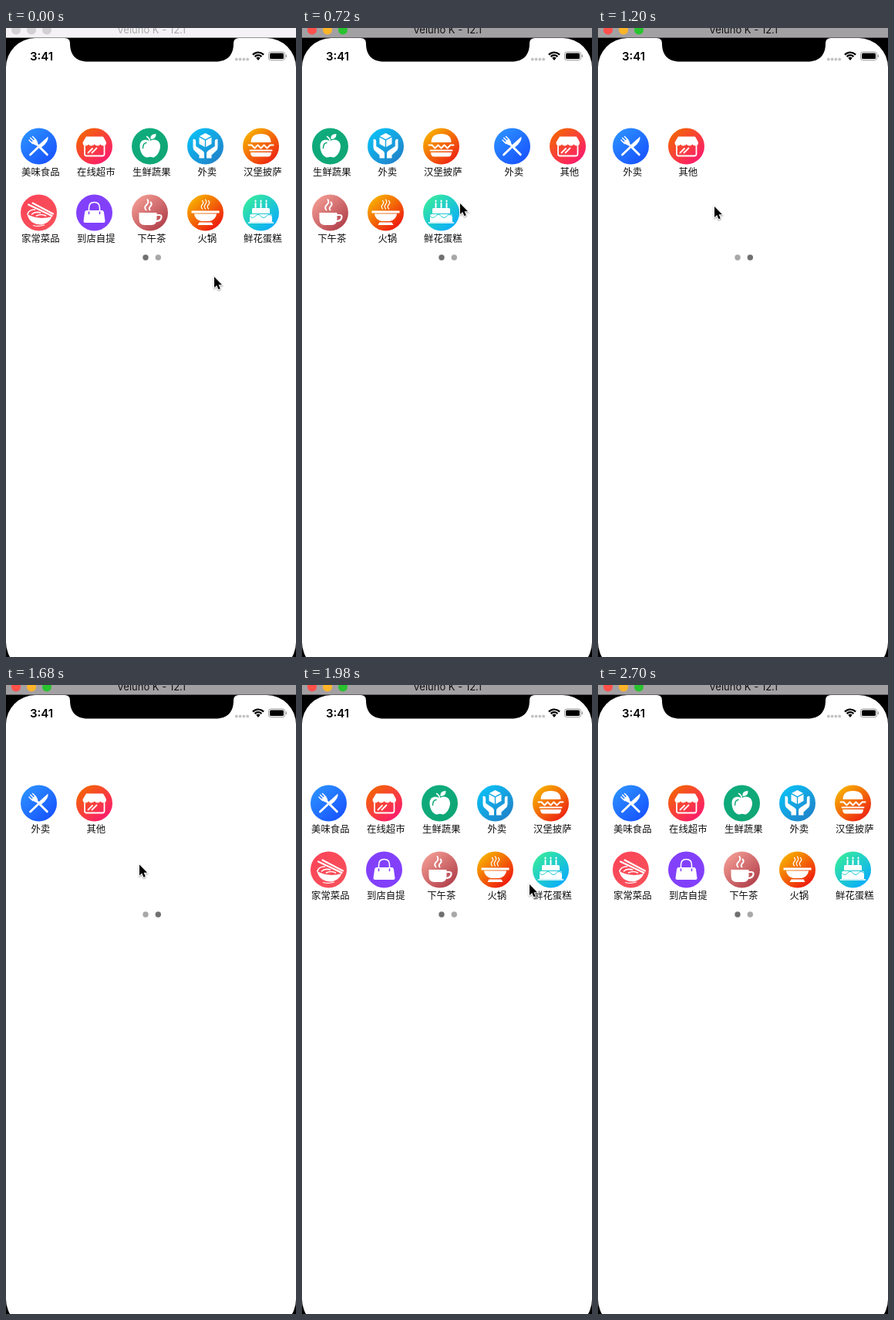
An HTML page with a canvas that plays this animation: 376 px wide and 814 px high, repeating every 3300 ms.

```html
<!DOCTYPE html>
<html lang="zh-CN">
<head>
<meta charset="utf-8">
<style>
html, body { margin: 0; width: 100%; height: 100%; overflow: hidden; background: #fff; }
canvas { display: block; }
</style>
</head>
<body>
<canvas id="stage" width="376" height="814"></canvas>
<script>
const ctx = document.getElementById('stage').getContext('2d');
const LOOP = 3300, STEP = 60, PAGE = 380, RADIUS = 23.5;

// Each icon: gradient ends, then layers of [kind, path, line width].
const icons = {
  cutlery: ['#2a8cff', '#1957ff', [
    ['line', 'M10.8 10.8 L-3 -3', 3],
    ['line', 'M-12.5 -8 L-8 -3.5 M-10.8 -10.8 L-6 -6 M-8 -12.5 L-3.5 -8', 1.5],
    ['fill', 'M-9.5 -5 L-5 -9.5 L-2 -6.5 Q-.5 -3 -2 -1.5 Q-5 -.5 -9.5 -5Z'],
    ['fill', 'M12 -12.5 Q13 -6 4 1 L1.5 3 L-2 0Z'],
    ['line', 'M-1.5 2 L-11 11', 2.8]]],
  shop: ['#f4600c', '#fb1f68', [
    ['fill', 'M-10.5 -12.5 H11 Q12 -12.5 15.5 -5 Q15.5 -.5 11.7 -.5 Q9 -.5 8 -2.5 Q6.5 -.5 4.2 -.5 Q2 -.5 .2 -2.5 Q-1.5 -.5 -4 -.5 Q-6.5 -.5 -7.5 -2.5 Q-8.5 -.5 -11.5 -.5 Q-15 -.5 -15 -5Z'],
    ['line', 'M-12.5 0 V10 Q-12.5 12.5 -10 12.5 H10.5 Q13 12.5 13 10 V0', 1.8],
    ['line', 'M-8 8.5 L-2.5 3 M-3 8.5 L3 2.5', 1.8]]],
  apple: ['#0fab7c', '#0fa674', [
    ['fill', 'M0 -6.5 C4 -10.5 13.5 -9 13.5 0 C13.5 8 7 15 4 14.5 Q0 13 -3 14.5 C-8 15 -13 8 -13 0 C-13 -9 -5 -9.5 0 -6.5Z'],
    ['fill', 'M1 -9 Q0 -16 8 -16 Q8.5 -9 1 -9Z'],
    ['line', 'M0 -7 Q-1 -11 -4 -12.5', 1.5],
    ['cut', 'M-9 2.5 Q-9 -4 -4.5 -4.5', 1.5]]],
  hands: ['#0cbcf2', '#1f86cc', [
    ['fill', 'M0 -17 L7.5 -13 L0 -9 L-7.5 -13Z'],
    ['fill', 'M-8 -11.5 L-.7 -7.8 V1 L-8 -3Z M8 -11.5 L.7 -7.8 V1 L8 -3Z'],
    ['fill', 'M-16 -9 Q-12.5 -10 -12.3 -6 V0 L-4 5.5 Q-1.5 7 -1.5 9 V15.5 H-8 V11.5 L-15 5 Q-16 3 -16 1Z'],
    ['fill', 'M16 -9 Q12.5 -10 12.3 -6 V0 L4 5.5 Q1.5 7 1.5 9 V15.5 H8 V11.5 L15 5 Q16 3 16 1Z']]],
  burger: ['#f7a800', '#ee2a12', [
    ['fill', 'M-13 -5 Q-13 -16 0 -16 Q13 -16 13 -5Z'],
    ['line', 'M-16 -1.5 H-12 L-8 2.5 L-4 -1.5 L0 2.5 L4 -1.5 L8 2.5 L12 -1.5 H16', 2],
    ['line', 'M-14 5.5 H14', 2],
    ['fill', 'M-13.5 8 H13.5 Q13.5 13.5 9 13.5 H-9 Q-13.5 13.5 -13.5 8Z']]],
  noodles: ['#fb4658', '#f7505a', [
    ['fill', 'M-15 2 Q0 10 17 5 Q14 13 4 15.5 Q-12 15.5 -15 2Z'],
    ['line', 'M-14.5 2 Q-13 -4 -5 -4 M-9 2 Q-5 -2 2 0 M-3 4 Q3 1 9 4', 1.6],
    ['line', 'M-13.5 -10.5 L17 4 M-8 -12.5 L18.5 1.5', 2.1],
    ['line', 'M-7 16.5 Q0 18.5 7 16', 1.2]]],
  bag: ['#8240fb', '#8240fb', [
    ['fill', 'M-10 -3 H10 Q12 -3 12.5 0 L14 11 Q14 13 12 13 H-12 Q-14 13 -14 11 L-12.5 0 Q-12 -3 -10 -3Z'],
    ['line', 'M-7 -1 V-6 Q-7 -13.5 0 -13.5 Q7 -13.5 7 -6 V-1', 1.6],
    ['cut', 'M-7 -1 V1.5 M7 -1 V1.5', 1.6]]],
  coffee: ['#ee958e', '#b5454f', [
    ['fill', 'M-14 0 H9 V8 Q9 16 2 16 H-7 Q-14 16 -14 8Z'],
    ['line', 'M9 3 H12 Q15.5 3 15 6 Q14 11 8 11', 2.2],
    ['line', 'M-5 -3.5 Q-8 -7 -4 -10.5 Q-1 -13 -3 -17 M0 -3.5 Q-2 -6 1 -8.5 Q3.5 -11 1 -13.5', 1.9]]],
  pot: ['#f7a800', '#ee1f0e', [
    ['fill', 'M-18 -2.5 H18 V.5 H15 Q13 10 5 11 H-5 Q-13 10 -15 .5 H-18Z'],
    ['cut', 'M-15 1 H15', .9],
    ['fill', 'M-8 12.5 H8 L10 16 H-10Z'],
    ['line', 'M-4 -5 q-2.5 -3 0 -5.5 t0 -5 M0 -5 q-2.5 -3 0 -6 t0 -6 M4 -5 q-2.5 -3 0 -5.5 t0 -5', 1.2]]],
  cake: ['#33e6a4', '#0cb0f6', [
    ['fill', 'M-10 -6 H10 Q11.5 -6 11.5 -4 V1 H-11.5 V-4 Q-11.5 -6 -10 -6Z'],
    ['fill', 'M-12.5 2 H12.5 Q14.5 2 14.5 4 V12 H-14.5 V4 Q-14.5 2 -12.5 2Z'],
    ['cut', 'M-14.5 4.5 q3.6 4 7.2 0 t7.2 0 t7.2 0 t7.4 0', 1],
    ['line', 'M-16 13 H16', 1.6],
    ['line', 'M-7 -7 V-12 M0 -7 V-12 M7 -7 V-12 M-7 -14.6 V-15.4 M0 -14.6 V-15.4 M7 -14.6 V-15.4', 2]]]
};
for (const icon of Object.values(icons))
  icon[2] = icon[2].map(([kind, d, width]) => [kind, new Path2D(d), width]);

const pages = [
  [['cutlery', '美味食品'], ['shop', '在线超市'], ['apple', '生鲜蔬果'], ['hands', '外卖'], ['burger', '汉堡披萨'],
   ['noodles', '家常菜品'], ['bag', '到店自提'], ['coffee', '下午茶'], ['pot', '火锅'], ['cake', '鲜花蛋糕']],
  [['cutlery', '外卖'], ['shop', '其他']]
];

// Keyframes: [time, values...]
const scrollKeys = [[600, 0], [660, 35], [720, 150], [780, 275], [840, 341], [900, 368], [960, 377], [1020, 380],
  [1680, 380], [1740, 330], [1800, 180], [1860, 72], [1920, 26], [1980, 8], [2040, 2], [2100, 0]];
const pointerKeys = [[60, 270, 322], [180, 268, 312], [420, 255, 228], [540, 253, 218], [600, 253, 218], [720, 205, 227],
  [840, 163, 230], [1080, 151, 231], [1620, 151, 231], [1740, 195, 234], [1800, 262, 238], [1860, 292, 239],
  [1980, 295, 258], [2040, 293, 380], [2100, 288, 540], [2160, 284, 636], [2220, 283, 654], [2340, 283, 665], [2520, 283, 830]];

function sample(keys, t) {
  const next = keys.findIndex(key => key[0] > t);
  if (next < 0) return keys[keys.length - 1].slice(1);
  if (next === 0) return keys[0].slice(1);
  const a = keys[next - 1], b = keys[next], k = (t - a[0]) / (b[0] - a[0]);
  return a.slice(1).map((v, i) => v + (b[i + 1] - v) * k);
}

function disc(x, y, r, color) {
  ctx.fillStyle = color;
  ctx.beginPath();
  ctx.arc(x, y, r, 0, Math.PI * 2);
  ctx.fill();
}

function text(str, x, y, font, color) {
  ctx.font = font;
  ctx.fillStyle = color;
  ctx.fillText(str, x, y);
}

function drawIcon(name, x, y) {
  const [from, to, layers] = icons[name];
  ctx.save();
  ctx.translate(x, y);
  const paint = ctx.createLinearGradient(-15, -17, 15, 17);
  paint.addColorStop(0, from);
  paint.addColorStop(1, to);
  disc(0, 0, RADIUS, paint);
  ctx.fillStyle = '#fff';
  ctx.lineCap = ctx.lineJoin = 'round';
  for (const [kind, path, width] of layers) {
    if (kind === 'fill') { ctx.fill(path); continue; }
    ctx.lineWidth = width;
    ctx.strokeStyle = kind === 'cut' ? paint : '#fff';
    ctx.stroke(path);
  }
  ctx.restore();
}

function drawMenu(scroll) {
  pages.forEach((items, page) => items.forEach(([name, label], i) => {
    const x = 42.5 + page * PAGE - scroll + (i % 5) * 72;
    const y = 153 + Math.floor(i / 5) * 86;
    if (x < -40 || x > 420) return;
    drawIcon(name, x, y);
    text(label, x + 2.3, y + 38, '12.4px "Noto Sans CJK SC", "Noto Sans CJK", sans-serif', '#111');
  }));
  const second = scroll > PAGE / 2;
  disc(181, 297, 3.7, second ? '#a8a8a8' : '#707070');
  disc(197.3, 297, 3.7, second ? '#707070' : '#a8a8a8');
}

const notch = new Path2D('M76 13 Q83 13 83 20 C83 35 91 43.5 106 43.5 H272 C287 43.5 295 35 295 20 Q295 13 302 13Z');

function drawFrame(active) {
  ctx.fillStyle = '#000';
  ctx.fillRect(0, 0, 376, 814);
  ctx.fillStyle = active ? '#a3a0a3' : '#f4f2f4';
  ctx.fillRect(0, 0, 376, 12.6);
  const lights = active ? ['#ff4f4b', '#ffb429', '#29c330'] : ['#d2d0d2', '#d2d0d2', '#d2d0d2'];
  lights.forEach((color, i) => disc(13 + i * 20, 2.5, 6, color));
  text('Veluno K - 12.1', 188.5, 7, '13px Inter, sans-serif', active ? '#111' : '#aaa8aa');
  ctx.fillStyle = '#fff';
  ctx.beginPath();
  ctx.roundRect(0, 13, 376, 820, 38);
  ctx.fill();
  ctx.fillStyle = '#000';
  ctx.fill(notch);
}

function drawStatus() {
  text('3:41', 46, 42, '600 15px Inter, sans-serif', '#000');
  for (let i = 0; i < 4; i++) disc(298.8 + i * 4.8, 40.5, 1.9, '#c4c4c4');
  ctx.strokeStyle = '#000';
  ctx.lineCap = 'butt';
  ctx.lineWidth = 2.3;
  for (const r of [6, 9.6]) {
    ctx.beginPath();
    ctx.arc(327, 41.2, r, -Math.PI * .76, -Math.PI * .24);
    ctx.stroke();
  }
  ctx.fillStyle = '#000';
  ctx.beginPath();
  ctx.moveTo(327, 42);
  ctx.arc(327, 41.2, 3.6, -Math.PI * .76, -Math.PI * .24);
  ctx.fill();
  ctx.strokeStyle = '#999';
  ctx.lineWidth = 1;
  ctx.beginPath();
  ctx.roundRect(340.5, 31, 21, 10.6, 2.8);
  ctx.stroke();
  ctx.beginPath();
  ctx.roundRect(342, 32.5, 18, 7.6, 1.5);
  ctx.fill();
  ctx.fillStyle = '#999';
  ctx.fillRect(362.8, 34.5, 1.3, 3.6);
}

const arrow = new Path2D('M0 0 V14 L3.2 11.1 L5.5 16.2 L7.8 15.2 L5.6 10.3 H10Z');

function drawPointer([x, y]) {
  ctx.save();
  ctx.translate(x, y);
  ctx.lineJoin = 'miter';
  ctx.lineWidth = 1.8;
  ctx.strokeStyle = '#fff';
  ctx.shadowColor = 'rgba(0,0,0,.4)';
  ctx.shadowBlur = 2;
  ctx.shadowOffsetY = 1;
  ctx.stroke(arrow);
  ctx.shadowColor = 'transparent';
  ctx.fillStyle = '#000';
  ctx.fill(arrow);
  ctx.restore();
}

function render() {
  const t = Math.floor(performance.now() % LOOP / STEP) * STEP;
  ctx.textAlign = 'center';
  drawFrame(t >= 600);
  drawStatus();
  drawMenu(sample(scrollKeys, t)[0]);
  drawPointer(sample(pointerKeys, t));
  requestAnimationFrame(render);
}
render();
</script>
</body>
</html>
```
